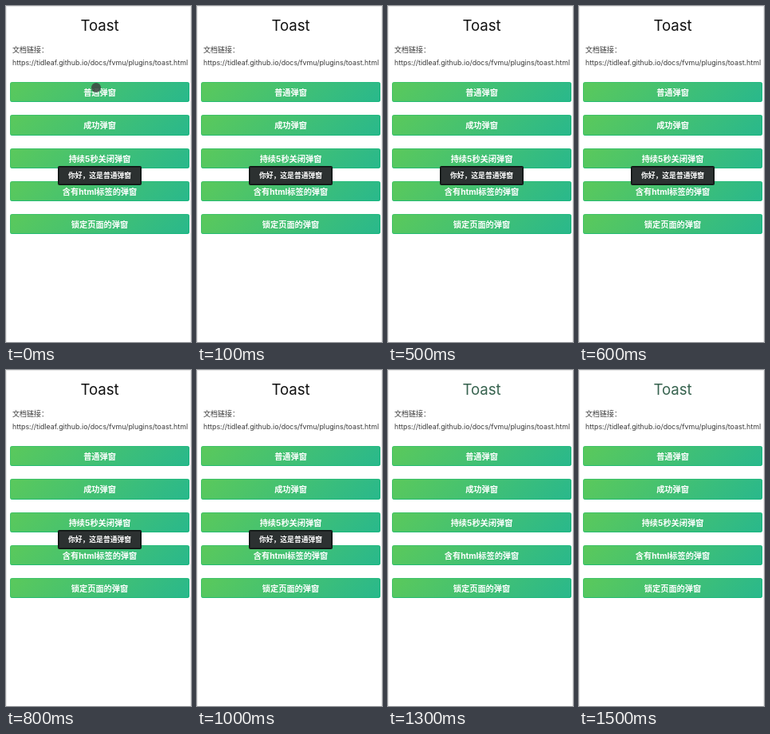
Animation of 232 by 420 pixels, one loop 1600 ms. Source, as an HTML page:

```html
<!DOCTYPE html>
<html lang="zh-CN">
<head>
<meta charset="utf-8">
<title>Toast</title>
<style>
html, body { margin: 0; width: 100%; height: 100%; overflow: hidden; background: #fff; }
body { font-family: Inter, "Noto Sans CJK SC", "Noto Sans CJK", sans-serif; }
.page { position: relative; width: 232px; height: 420px; overflow: hidden; }
.page::after {
  content: ""; position: absolute; inset: 0;
  border: 1px solid #e9e9e9; border-bottom: 0;
}
.page > * { position: absolute; margin: 0; white-space: nowrap; }
h1 {
  left: 1.5px; width: 232px; top: 9px; line-height: 30px;
  font-size: 18.6px; font-weight: 400; text-align: center; color: #111;
  animation: tint 1600ms step-end infinite;
}
.label, .link { left: 8px; line-height: 16px; color: #3a3a3a; }
.label { top: 47px; font-size: 9px; font-family: "Noto Sans CJK SC", "Noto Sans CJK", sans-serif; }
.link { top: 63px; font-size: 8.85px; }
.btn {
  left: 5px; width: 225px; height: 25.3px; top: calc(95.2px + var(--i) * 41.2px);
  border-radius: 3px;
  box-shadow: inset 0 0 0 1px rgba(16, 184, 122, .35), inset -1px -1px rgba(12, 178, 120, .45);
  background: linear-gradient(135deg, #5bc95b, #29b88c);
  color: #fff; font-size: 10.2px; font-weight: 700; line-height: 26px; text-align: center;
}
.toast {
  left: 65px; top: 200px; width: 105px; height: 24px; box-sizing: border-box;
  border: 1px solid #0e1312; border-radius: 1.5px; background: #2c3131;
  box-shadow: inset 0 0 0 1px #1a1f1e;
  color: #fff; font-size: 8.8px; font-weight: 700; line-height: 22.5px; text-align: center;
  animation: toast 1600ms step-end infinite;
}
.touch {
  left: 107px; top: 96px; width: 12px; height: 12px; border-radius: 50%;
  background: rgba(62, 72, 66, .88);
  animation: touch 1600ms step-end infinite;
}
@keyframes tint { 0% { color: #111; } 68.75%, 100% { color: #37634f; } }
@keyframes toast { 0% { opacity: 1; } 68.75%, 100% { opacity: 0; } }
@keyframes touch { 0% { opacity: 1; } 6.25%, 100% { opacity: 0; } }
</style>
</head>
<body>
<div class="page">
  <h1>Toast</h1>
  <div class="label">文档链接：</div>
  <div class="link">https://tidleaf.github.io/docs/fvmu/plugins/toast.html</div>
  <div class="btn" style="--i:0">普通弹窗</div>
  <div class="btn" style="--i:1">成功弹窗</div>
  <div class="btn" style="--i:2">持续5秒关闭弹窗</div>
  <div class="btn" style="--i:3">含有html标签的弹窗</div>
  <div class="btn" style="--i:4">锁定页面的弹窗</div>
  <div class="toast">你好，这是普通弹窗</div>
  <div class="touch"></div>
</div>
</body>
</html>
```
